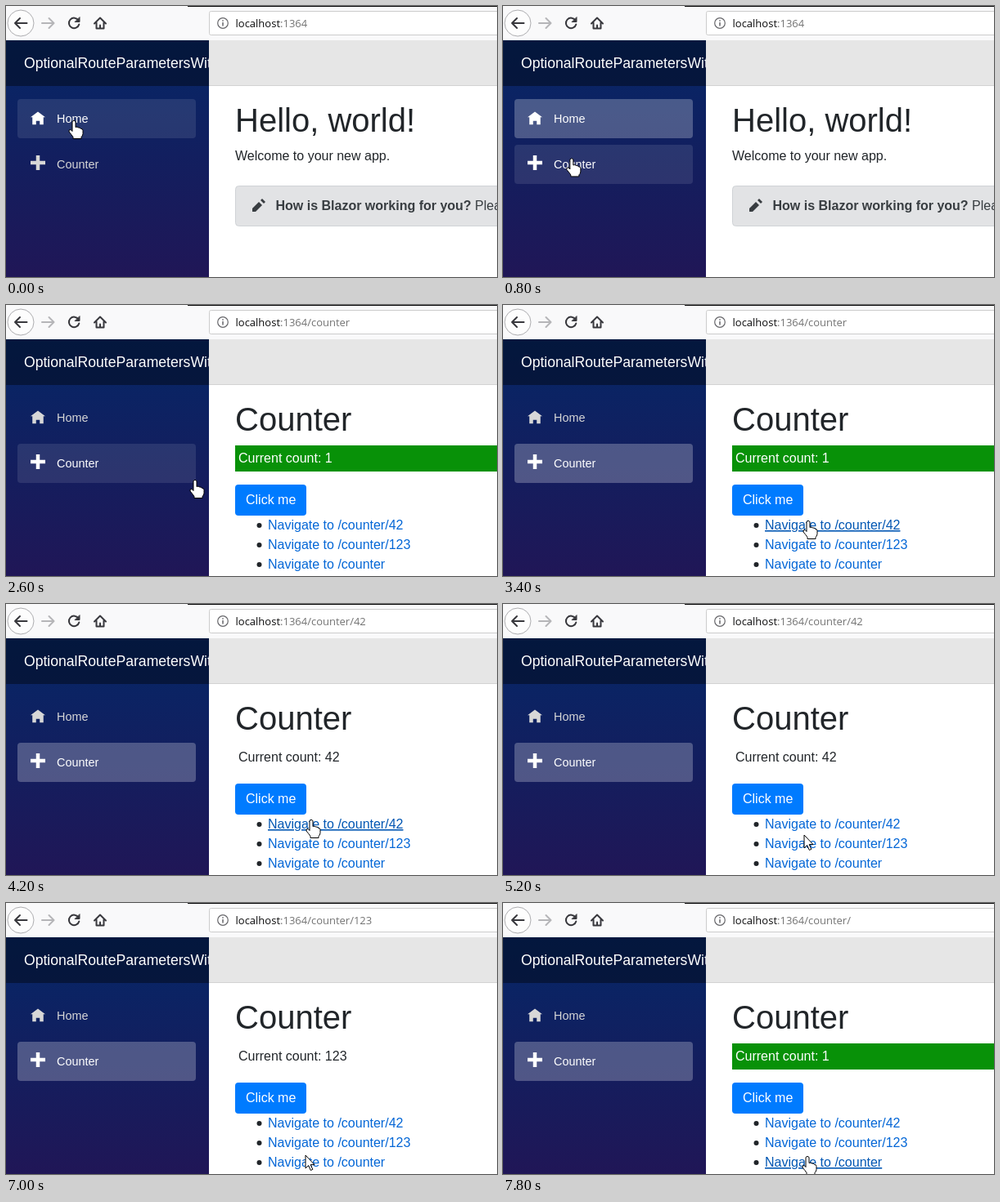
An HTML page for the animation above (8000 ms loop, 600 px wide and 332 px high).

```html
<!DOCTYPE html>
<html lang="en">
<head>
<meta charset="utf-8">
<title>Optional route parameters</title>
<style>
  html, body { margin: 0; width: 100%; height: 100%; overflow: hidden; background: #fff; }
  svg { display: block; width: 600px; height: 332px; font: 16px "Liberation Sans", Arial, sans-serif; }
  text { white-space: pre; fill: #212529; }
  .title { font-size: 40px; }
  .address { font: 13px "Open Sans", sans-serif; fill: #737373; }
  .address tspan { fill: #0c0c0d; }
  .brand { font-size: 17.6px; fill: #fff; }
  .item text { font-size: 14.4px; fill: inherit; }
  .tool { fill: none; stroke: #38383d; stroke-width: 2; stroke-linejoin: round; stroke-linecap: round; }
  .alert text { fill: #383d41; }
  .link text { fill: #0366d6; }
  .link.hover text { fill: #0056b3; text-decoration: underline; }
  #cursor { fill: #fff; stroke: #000; stroke-linejoin: round; }
</style>
</head>
<body>
<svg viewBox="0 0 600 332">
  <defs>
    <linearGradient id="night" gradientUnits="userSpaceOnUse" x1="0" y1="42" x2="0" y2="612">
      <stop stop-color="#052767"/><stop offset="1" stop-color="#3a0647"/>
    </linearGradient>
    <clipPath id="sidebar"><path d="M0 42H248V332H0Z"/></clipPath>
  </defs>

  <!-- Browser toolbar -->
  <rect width="600" height="42" fill="#f9f9fa"/>
  <rect x="222" width="378" height="1" fill="#0c0c0d"/>
  <circle cx="18" cy="21" r="16" fill="#fdfdfd" stroke="#adadb0"/>
  <g class="tool">
    <path d="M25.5 21H11M17 15L11 21L17 27"/>
    <path d="M44 21H58M52.500 15L58.500 21L52.500 27" stroke="#b5b5b8"/>
    <path d="M88.500 17.500A6.300 6.300 0 1 0 89.300 22.500"/>
    <path d="M90 14V19.500H84.500Z" fill="#38383d" stroke-width="1"/>
    <path d="M108 21.500L115 14.500L122 21.500M110.500 20.500V27.500H119.500V20.500"/>
    <path d="M115 27V23.500"/>
  </g>
  <rect x="248.500" y="6.500" width="360" height="29" rx="2" fill="#fff" stroke="#ccc"/>
  <circle cx="265" cy="21" r="6.300" fill="none" stroke="#66666a" stroke-width="1.200"/>
  <path d="M265 20V24.500M265 17.200V18.700" stroke="#66666a" stroke-width="1.500"/>
  <text class="address" x="280.500" y="26"><tspan>localhost</tspan>:1364<tspan id="route" style="fill:#737373"></tspan></text>

  <!-- Sidebar -->
  <g clip-path="url(#sidebar)">
    <rect y="42" width="248" height="290" fill="url(#night)"/>
    <rect y="42" width="248" height="56" fill="#000" opacity=".4"/>
    <text class="brand" x="22" y="76">OptionalRouteParametersWith</text>
    <g class="item">
      <rect x="14" y="114" width="218" height="48" rx="4" fill="#fff"/>
      <path transform="translate(30 129.500) scale(2.250)" d="M4 0L0 3H1V7H3V5H5V7H7V3H8Z"/>
      <text x="62" y="143">Home</text>
    </g>
    <g class="item">
      <rect x="14" y="170" width="218" height="48" rx="4" fill="#fff"/>
      <path transform="translate(30 183) scale(2.250)" d="M3 0V3H0V5H3V8H5V5H8V3H5V0Z"/>
      <text x="62" y="199">Counter</text>
    </g>
  </g>

  <!-- Main area -->
  <rect x="248" y="42" width="352" height="56" fill="#e6e6e6"/>
  <rect x="248" y="97" width="352" height="1" fill="#d2d2d2"/>

  <g id="home">
    <text class="title" x="280" y="153.500">Hello, world!</text>
    <text x="280" y="189">Welcome to your new app.</text>
    <g class="alert">
      <rect x="280.500" y="220.500" width="340" height="49" rx="4" fill="#e2e3e5" stroke="#d0d3d6"/>
      <path transform="translate(301 236) scale(2)" fill="#383d41" d="M6 0L5 1L7 3L8 2ZM4 2L0 6V8H2L6 4Z"/>
      <text x="329.500" y="250"><tspan font-weight="bold">How is Blazor working for you?</tspan> Please take</text>
    </g>
  </g>

  <g id="counter">
    <text class="title" x="280" y="153.500">Counter</text>
    <rect id="banner" x="280" y="172" width="320" height="32" fill="#089108"/>
    <text id="count" x="284" y="193"></text>
    <rect id="button" x="280" y="220" width="87" height="38" rx="4"/>
    <text x="293" y="244" style="fill:#fff">Click me</text>
    <g class="link"><circle cx="309.500" cy="270" r="3" fill="#212529"/><text x="320" y="275">Navigate to /counter/42</text></g>
    <g class="link"><circle cx="309.500" cy="294" r="3" fill="#212529"/><text x="320" y="299">Navigate to /counter/123</text></g>
    <g class="link"><circle cx="309.500" cy="318" r="3" fill="#212529"/><text x="320" y="323">Navigate to /counter</text></g>
  </g>

  <path id="cursor"/>
</svg>
<script>
const LOOP = 8000, TICK = 200;
const HAND = "M-2 1.5Q0-1 2 1.5V8.500Q4 7.500 5.500 9Q7.500 8.500 8.500 10.500Q10.800 10 11 12.500V16.500Q10.500 19.500 9 20.500V22.500H-1V20.500Q-3 17.500-6 14Q-6.500 11-4 11.500L-2 13.500Z";
const ARROW = "M0 0V16L3.700 12.600L6.300 18.500L8.800 17.400L6.200 11.600H11Z";

// Pointer path: time, x, y
const path = [
  [0, 83, 140], [200, 83, 140], [1000, 84, 195], [2200, 84, 195],
  [2600, 231, 214], [3200, 373, 264], [4800, 373, 264],
  [5200, 368, 283], [5600, 368, 291], [6600, 368, 291],
  [7000, 366, 309], [7200, 372, 310], [LOOP, 372, 310]
];

const pages = [
  { from: 0, route: "" },
  { from: 2200, route: "/counter", count: 1 },
  { from: 4200, route: "/counter/42", count: 42 },
  { from: 6000, route: "/counter/123", count: 123 },
  { from: 7600, route: "/counter/", count: 1 }
];

const byId = id => document.getElementById(id);
const items = [...document.querySelectorAll(".item")];
const links = [...document.querySelectorAll(".link")];
const linkWidths = links.map(link => link.querySelector("text").getComputedTextLength());
const show = (element, visible) => { element.style.display = visible ? "" : "none"; };

function pointerAt(time) {
  const next = Math.max(1, path.findIndex(point => point[0] >= time));
  const [t0, x0, y0] = path[next - 1], [t1, x1, y1] = path[next];
  const part = (time - t0) / (t1 - t0);
  const ease = part * part * (3 - 2 * part);
  return { x: x0 + (x1 - x0) * ease, y: y0 + (y1 - y0) * ease };
}

function draw(time) {
  const pointer = pointerAt(time);
  const inside = (x, y, width, height) =>
    pointer.x >= x && pointer.x < x + width && pointer.y >= y && pointer.y < y + height;
  const page = pages.filter(entry => entry.from <= time).pop();
  const onCounter = page.count !== undefined;
  let clickable = false;

  items.forEach((item, i) => {
    const active = onCounter === (i === 1);
    const hover = inside(14, 114 + 56 * i, 218, 48);
    item.style.fill = active || hover ? "#fff" : "#d7d7d7";
    item.querySelector("rect").style.opacity = hover ? .1 : active ? .25 : 0;
    clickable ||= hover;
  });

  links.forEach((link, i) => {
    const hover = onCounter && inside(320, 261.6 + 24 * i - (i === 2 ? 0 : 1), linkWidths[i], 17);
    link.classList.toggle("hover", hover);
    clickable ||= hover;
  });

  const onButton = onCounter && inside(280, 220, 87, 38);
  byId("button").style.fill = onButton ? "#0069d9" : "#007bff";
  clickable ||= onButton;

  show(byId("home"), !onCounter);
  show(byId("counter"), onCounter);
  show(byId("banner"), page.count === 1);
  byId("count").textContent = "Current count: " + page.count;
  byId("count").style.fill = page.count === 1 ? "#fff" : "#212529";
  byId("route").textContent = page.route;
  byId("cursor").setAttribute("d", clickable ? HAND : ARROW);
  byId("cursor").setAttribute("transform", `translate(${pointer.x} ${pointer.y})`);
}

function frame() {
  draw(Math.floor(performance.now() % LOOP / TICK) * TICK);
  requestAnimationFrame(frame);
}
frame();
</script>
</body>
</html>
```
